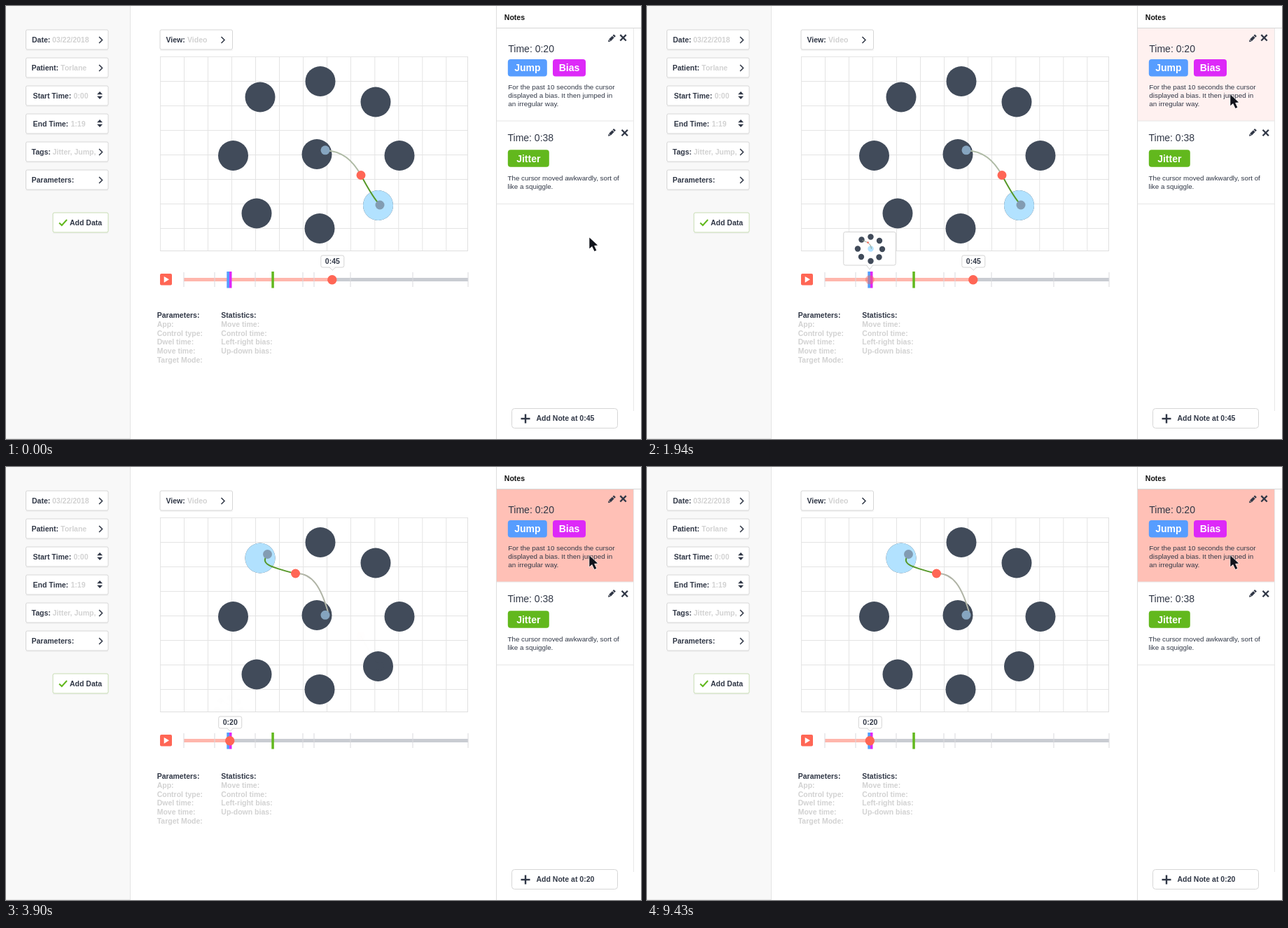
These frames come from a looping animation (907 by 618 pixels, 9500 ms). An HTML page with a canvas:

```html
<!DOCTYPE html>
<html lang="en">
<head>
<meta charset="utf-8">
<title>Session review</title>
<style>
html, body { margin: 0; width: 100%; height: 100%; overflow: hidden; background: #fff; }
canvas { display: block; width: 907px; height: 618px; }
</style>
</head>
<body>
<canvas id="stage"></canvas>
<script>
const W = 907, H = 618, LOOP = 9500;
const FONT = '"Liberation Sans", Arial, sans-serif';
const INK = '#303746', DARK = '#414b5a', RED = '#ff6655', PALE = '#d2d2d2';
const BLUE = '#579dff', MAGENTA = '#dd29f8', GREEN = '#62b81d', LIGHT = '#b2e2ff';

const canvas = document.getElementById('stage');
const dpr = window.devicePixelRatio || 1;
canvas.width = W * dpr;
canvas.height = H * dpr;
const c = canvas.getContext('2d');

// Ring of targets, clockwise from the top
const ring = [[449, 107.5], [528, 137], [562, 213.5], [531.5, 284.5],
  [448, 317.5], [358, 296], [324.5, 213.5], [363, 130]];
const miniRing = [[0, -17], [12.5, -11.5], [16.5, .5], [12, 12],
  [0, 17.5], [-13.5, 11.5], [-18.5, 0], [-13, -13]];

const mix = (a, b, k) => a + (b - a) * k;

// CSS-style cubic-bezier(x1, y1, x2, y2)
function bezier(x1, y1, x2, y2) {
  const at = (a, b, s) => 3 * a * s * (1 - s) ** 2 + 3 * b * s * s * (1 - s) + s ** 3;
  return x => {
    if (x <= 0) return 0;
    if (x >= 1) return 1;
    let lo = 0, hi = 1;
    for (let i = 0; i < 24; i++) {
      const mid = (lo + hi) / 2;
      if (at(x1, x2, mid) < x) lo = mid; else hi = mid;
    }
    return at(y1, y2, lo);
  };
}
const ease = bezier(.25, .1, .25, 1);
const phase = (t, start, length) => ease((t - start) / length);

function text(str, x, y, size = 10.5, color = INK, bold = true, align = 'left') {
  c.font = (bold ? 'bold ' : '') + size + 'px ' + FONT;
  c.fillStyle = color;
  c.textAlign = align;
  c.fillText(str, x, y);
}

function rect(x, y, w, h, color) {
  c.fillStyle = color;
  c.fillRect(x, y, w, h);
}

function disc(x, y, r, color) {
  c.fillStyle = color;
  c.beginPath();
  c.arc(x, y, r, 0, 7);
  c.fill();
}

function box(x, y, w, h, r, fill, stroke) {
  c.beginPath();
  c.roundRect(x, y, w, h, r);
  c.fillStyle = fill;
  c.fill();
  if (stroke) {
    c.strokeStyle = stroke;
    c.lineWidth = 1;
    c.stroke();
  }
}

function line(points, color, width = 1) {
  c.strokeStyle = color;
  c.lineWidth = width;
  c.beginPath();
  points.forEach(([x, y], i) => i ? c.lineTo(x, y) : c.moveTo(x, y));
  c.stroke();
}

function poly(points, color) {
  c.fillStyle = color;
  c.beginPath();
  points.forEach(([x, y]) => c.lineTo(x, y));
  c.closePath();
  c.fill();
}

function curve(x, y, pts, color, width = 2) {
  c.strokeStyle = color;
  c.lineWidth = width;
  c.beginPath();
  c.moveTo(x, y);
  c.bezierCurveTo(...pts);
  c.stroke();
}

function faded(alpha, draw) {
  if (alpha <= 0) return;
  c.save();
  c.globalAlpha *= alpha;
  draw();
  c.restore();
}

function button(x, y, w, border = '#d6d6d6') {
  rect(x, y + 28.5, w, 1, '#ececec');
  box(x, y, w, 28, 2, '#fff', border);
}

const chevron = (x, y) => line([[x, y - 4.5], [x + 4.5, y], [x, y + 4.5]], INK, 1.5);

function sorter(x, y) {
  poly([[x - 4, y - 1.2], [x, y - 5.5], [x + 4, y - 1.2]], INK);
  poly([[x - 4, y + 1.2], [x, y + 5.5], [x + 4, y + 1.2]], INK);
}

function sidebar() {
  rect(0, 0, 177, H, '#f8f8f8');
  rect(177, 0, 1, H, '#e4e4e4');
  rect(0, 617, 177, 1, '#e4e4e4');
  const fields = [
    ['Date:', '03/22/2018', 37, 66], ['Patient:', 'Torlane', 36.5, 78],
    ['Start Time:', '0:00', 38.5, 96.5], ['End Time:', '1:19', 38.5, 92.5],
    ['Tags:', 'Jitter, Jump,', 36.5, 66.5], ['Parameters:', '', 36.5, 0]
  ];
  fields.forEach(([label, value, x, vx], i) => {
    const y = 48 + i * 40;
    button(28.5, y - 14, 117.5);
    text(label, x, y + 4);
    text(value, vx, y + 4, 10.5, PALE);
    if (i === 2 || i === 3) sorter(134, y - .5);
    else chevron(133, y + .5);
  });
  button(67, 295, 79, '#c6dcb2');
  line([[76, 309.5], [79.7, 313], [87, 305]], GREEN, 2);
  text('Add Data', 91, 313);
}

function grid() {
  button(220, 34, 103.5);
  text('View:', 228.5, 52);
  text('Video', 259, 52, 10.5, PALE);
  chevron(307.5, 48.5);
  for (let i = 0; i < 13; i++) rect(220 + i * 34 + (i > 8 ? .3 : 0), 72, 1, 278, '#e4e4e4');
  for (let i = 0; i < 8; i++) rect(220, 72 + i * 35, 440, 1, '#e4e4e4');
  rect(659, 72, 1, 278, '#e0e0e0');
  rect(220, 349, 440, 1, '#e0e0e0');
}

function targets() {
  ring.forEach(([x, y]) => disc(x, y, 21.5, DARK));
  disc(444, 211.5, 21.5, DARK);
}

function trailDown() {
  disc(531.5, 284.5, 21.5, LIGHT);
  curve(456, 206, [480, 207, 495, 220, 507, 241.5], '#aebaa5');
  curve(507, 241.5, [515, 256, 523, 272, 534, 284], '#57992a');
  disc(456, 205.8, 6.5, '#86a5c0');
  disc(534, 284, 6.5, '#829cb2');
  disc(507, 241.5, 6.5, RED);
}

function trailUp() {
  disc(363, 130, 21.5, LIGHT);
  curve(372, 127, [365, 138, 374, 142, 413, 152], '#57992a');
  curve(413, 152, [437, 150, 450, 172, 460, 207], '#b0b4a6');
  disc(373.5, 124.5, 6.5, '#829cb2');
  disc(456, 211.3, 6.5, '#86a5c0');
  disc(413.5, 152, 6.5, RED);
}

function callout(x, y, w, h, tip) {
  box(x - w / 2, y, w, h, 2.5, '#fff', '#d4d4d4');
  const b = y + h;
  poly([[x - 4.5, b - .6], [x + 4.5, b - .6], [x, b + tip]], '#fff');
  line([[x - 4.5, b], [x, b + tip], [x + 4.5, b]], '#d4d4d4');
}

function timeline(knob, hoverX, hover, shift, jump) {
  rect(254, 388, 406, 5, '#c9ccd2');
  rect(254, 388, knob - 254, 5, '#ffb6ac');
  [254, 298, 356, 424, 440, 492, 581, 660].forEach(x => rect(x - .5, 380, 1, 21, '#d9dade'));
  rect(315.3, 379, 3.7, 23.5, BLUE);
  rect(319, 379, 3.5, 23.5, MAGENTA);
  rect(379.3, 379, 3.5, 23.5, GREEN);
  box(220, 382, 17, 16.5, 2, RED);
  poly([[225.7, 386], [233, 390.3], [225.7, 394.7]], '#fff');

  faded(hover, () => {
    faded(.45, () => disc(hoverX, 390.7, 6.5, RED));
    preview(hoverX, shift);
  });
  disc(knob, 390.8, 6.7, RED);
  callout(knob + .5, 356, 33, 17, 4);
  stamp(knob + .5, 368.2, '', jump, 'center');
}

// Clock label that blends from 0:45 to 0:20
function stamp(x, y, prefix, jump, align) {
  faded(1 - jump, () => text(prefix + '0:45', x, y, 10.5, INK, true, align));
  faded(jump, () => text(prefix + '0:20', x, y, 10.5, INK, true, align));
}

function preview(x, shift) {
  callout(x - .3, 322.5, 74.5, 47.5, 6);
  c.save();
  c.translate(x + 1.2, 346.5);
  miniRing.forEach(([a, b]) => disc(a, b, 4.2, DARK));
  disc(0, 0, 4.2, LIGHT);
  faded(1 - shift, () => {
    curve(-18, 0, [-11, 4, -5, 0, 1, 1], '#8f9b88', 1);
    disc(-8, 1, 1.2, RED);
  });
  faded(shift, () => {
    curve(-12, -12, [-7, -10, 0, -9, 1, 0], '#8f9b88', 1);
    disc(-4, -9, 1.2, RED);
  });
  c.restore();
}

function stats() {
  const cols = [
    [215.7, 'Parameters:', 'App:', 'Control type:', 'Dwel time:', 'Move time:', 'Target Mode:'],
    [307.3, 'Statistics:', 'Move time:', 'Control time:', 'Left-right bias:', 'Up-down bias:']
  ];
  for (const [x, ...rows] of cols)
    rows.forEach((row, i) => text(row, x, 445.3 + i * 12.65, 10.5, i ? PALE : INK));
}

function pencil(x, y) {
  c.save();
  c.translate(x, y);
  c.rotate(-Math.PI / 4);
  rect(-4, -1.9, 6.8, 3.8, INK);
  rect(3.6, -1.9, 2.4, 3.8, INK);
  poly([[-4.6, -1.9], [-7.4, 0], [-4.6, 1.9]], INK);
  c.restore();
}

function cross(x, y) {
  line([[x - 4.2, y - 4.2], [x + 4.2, y + 4.2]], INK, 2.3);
  line([[x + 4.2, y - 4.2], [x - 4.2, y + 4.2]], INK, 2.3);
}

function tag(x, y, w, label, color) {
  box(x, y, w, 24.5, 4, color);
  text(label, x + w / 2, y + 17.3, 14, '#fff', true, 'center');
}

function notes(first, second, jump) {
  faded(first, () => rect(701, 32, 195, 132, '#fff1f0'));
  faded(jump, () => rect(701, 32, 195, 132, '#ffc0b6'));
  faded(second, () => rect(701, 164, 195, 118, '#fff1f0'));
  rect(700, 0, 1, H, '#dedede');
  rect(700, 31, 207, 1, '#d6d6d6');
  rect(896, 32, 1, 546, '#e8e8e8');
  rect(701, 163.5, 195, 1, '#e6e6e6');
  rect(701, 282, 195, 1, '#e6e6e6');
  text('Notes', 711.8, 19.8, 10.5, '#111');

  pencil(865.3, 46);
  cross(881.5, 45.3);
  text('Time: 0:20', 717.3, 66, 14, INK, false);
  tag(716.8, 76, 56, 'Jump', BLUE);
  tag(781, 76, 47, 'Bias', MAGENTA);
  ['For the past 10 seconds the cursor', 'displayed a bias. It then jumped in', 'an irregular way.']
    .forEach((row, i) => text(row, 717.3, 118.7 + i * 12, 9.85, INK, false));

  pencil(865.3, 180.5);
  cross(883.7, 181);
  text('Time: 0:38', 716.5, 192.7, 14, INK, false);
  tag(716.8, 205.2, 59, 'Jitter', GREEN);
  ['The cursor moved awkwardly, sort of', 'like a squiggle.']
    .forEach((row, i) => text(row, 716.5, 248.7 + i * 12, 9.8, INK, false));

  box(722.5, 574.5, 151, 28, 4, '#fff', '#d6d6d6');
  rect(735.5, 587.8, 13, 2.4, INK);
  rect(740.8, 582.5, 2.4, 13, INK);
  stamp(757.5, 592.3, 'Add Note at ', jump, 'left');
}

function pointer(x, y) {
  const shape = [[0, 0], [0, 15.8], [3.8, 12.6], [7.2, 19.5], [10, 18.2], [6.8, 11.5], [11.8, 11]];
  c.save();
  c.translate(x, y);
  c.lineJoin = 'round';
  line([...shape, [0, 0]], 'rgba(255,255,255,.75)', 1.5);
  poly(shape, '#11141c');
  c.restore();
}

function draw(t) {
  const enter = phase(t, 200, 500);
  const shift = phase(t, 1180, 500);
  const jump = phase(t, 3570, 380);

  c.setTransform(dpr, 0, 0, dpr, 0, 0);
  rect(0, 0, W, H, '#fff');
  sidebar();
  grid();
  targets();
  faded(1 - jump, trailDown);
  faded(jump, trailUp);
  timeline(mix(465.8, 318.3, jump), mix(380.8, 318.3, shift), enter * (1 - jump), shift, jump);
  stats();
  notes(shift, enter * (1 - shift), jump);
  pointer(833.3, mix(mix(330.5, 199.5, enter), 126.5, shift));
}

const start = performance.now();
function tick() {
  draw((performance.now() - start) % LOOP);
  requestAnimationFrame(tick);
}
tick();
</script>
</body>
</html>
```
